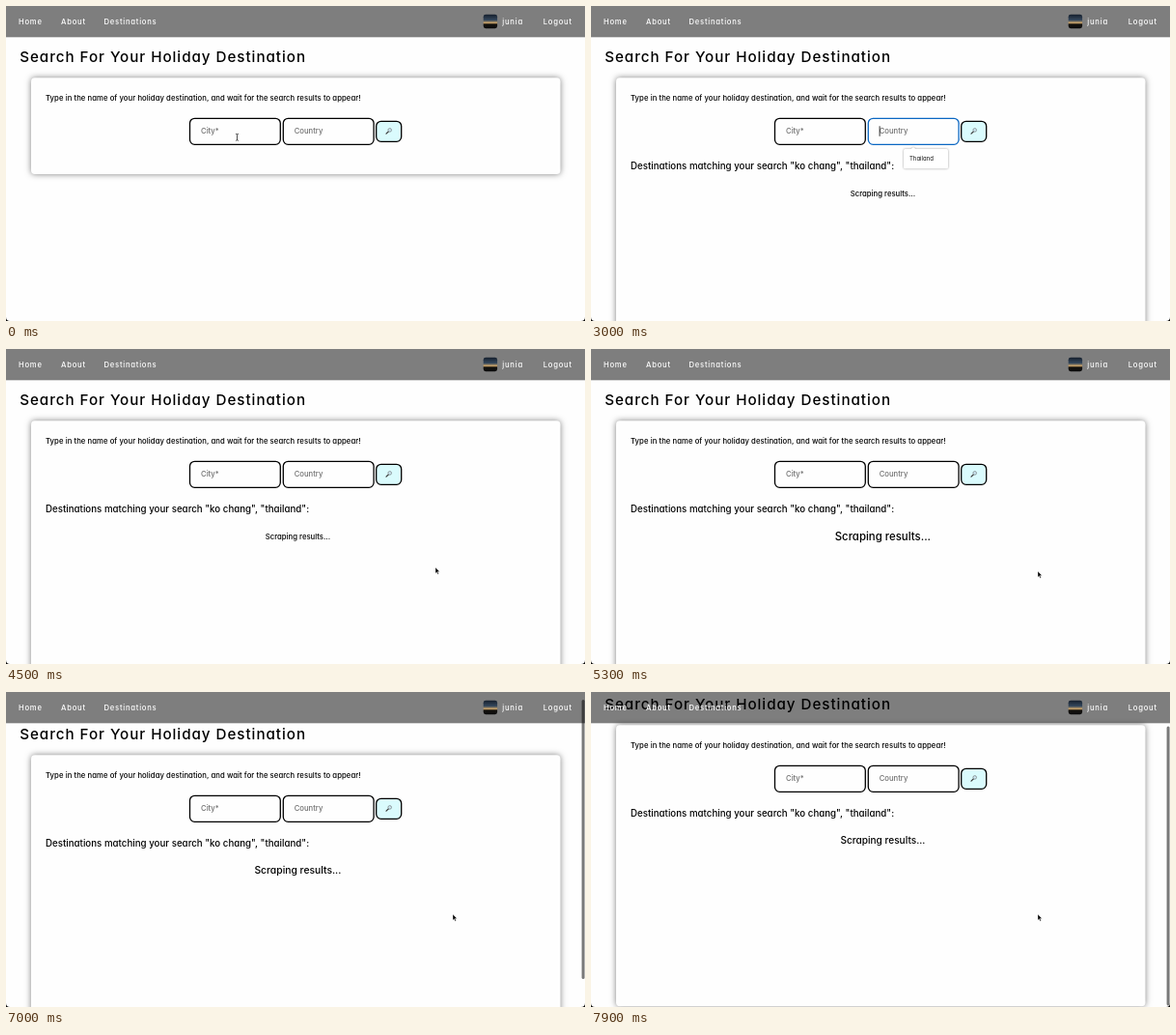
Recreate the animation shown at these times as an HTML page. Size 600 by 326 pixels, loop 8 s.

```html
<!DOCTYPE html>
<html lang="en">
<head>
<meta charset="utf-8">
<title>Holiday search</title>
<style>
  html, body { margin: 0; width: 100%; height: 100%; overflow: hidden; background: #fefefe; }
  svg { display: block; width: 600px; height: 326px; }
  text { font: 500 7.7px Inter, "Open Sans", sans-serif; font-feature-settings: "cv11"; white-space: pre; }
  .nav text { fill: #fff; letter-spacing: .74px; }
  .title { font-size: 15.2px; letter-spacing: .96px; }
  .intro { letter-spacing: .07px; }
  .match { font-size: 9.7px; letter-spacing: .02px; }
  .field { fill: #fefefe; stroke-width: 1.3px; }
  .menu { filter: drop-shadow(0 .5px 1px rgba(0,0,0,.4)); }
  .menu text { font-size: 6px; font-weight: 400; fill: #111; }
  .card { fill: #fefefe; filter: drop-shadow(0 0 3.4px rgba(0,0,0,.5)); }
</style>
</head>
<body>
<svg viewBox="0 0 600 326">
  <defs>
    <linearGradient id="dusk" x2="0" y2="1">
      <stop offset="0" stop-color="#16202e"/>
      <stop offset=".4" stop-color="#34475c"/>
      <stop offset=".6" stop-color="#c9a36a"/>
      <stop offset=".7" stop-color="#15130f"/>
      <stop offset="1" stop-color="#0b0b0c"/>
    </linearGradient>
  </defs>
  <rect width="600" height="326" fill="#fefefe"/>

  <g id="page">
    <text class="title" x="14.2" y="57.8">Search For Your Holiday Destination</text>
    <rect id="card" class="card" x="26" y="74.3" width="548.5" rx="4"/>
    <text class="intro" x="41" y="97.6">Type in the name of your holiday destination, and wait for the search results to appear!</text>
    <rect id="cityBox" class="field" x="190.5" y="116.3" width="93.8" height="27" rx="5"/>
    <rect id="countryBox" class="field" x="287.3" y="116.3" width="93.8" height="27" rx="5"/>
    <text id="city" x="202" y="132.2"></text>
    <text id="country" x="298.7" y="132.2"></text>
    <rect id="caret" y="124.3" width=".8" height="10.5"/>
    <rect x="383.7" y="119.3" width="26" height="21" rx="5" fill="#dafbfd" stroke="#000" stroke-width="1.3"/>
    <path d="M396.4 129.8 L394 132.2" stroke="#333" stroke-width="1.2" stroke-linecap="round"/>
    <circle cx="397.7" cy="128.4" r="1.8" fill="#cdeaf4" stroke="#666" stroke-width=".6"/>
    <g id="results">
      <text class="match" x="41" y="169">Destinations matching your search "ko chang", "thailand":</text>
      <g id="pulse"><text text-anchor="middle" y="2.5">Scraping results...</text></g>
    </g>
    <g id="menu" class="menu"></g>
  </g>

  <g class="nav">
    <rect width="600" height="32.3" fill="#000" fill-opacity=".5"/>
    <text x="13" y="18.6">Home</text>
    <text x="57" y="18.6">About</text>
    <text x="101.5" y="18.6">Destinations</text>
    <rect x="494.7" y="8.8" width="14.4" height="14.4" rx="2.4" fill="url(#dusk)"/>
    <text x="514.3" y="18.6">junia</text>
    <text x="556.7" y="18.6">Logout</text>
  </g>
  <rect id="thumb" x="596.6" width="3" height="289" rx="1.5" fill="#000" fill-opacity=".52"/>
  <path id="beam" d="M-1.4 -3.5 Q0 -3.5 0 -2.5 Q0 -3.5 1.4 -3.5 M0 -2.5 V2.5 M-1.4 3.5 Q0 3.5 0 2.5 Q0 3.5 1.4 3.5" fill="none" stroke="#222" stroke-width=".8"/>
  <path id="arrow" d="M0 0 V6.2 L1.4 4.9 L2.4 7.2 L3.4 6.8 L2.4 4.5 H4.4 Z" stroke="#fff" stroke-width=".4"/>
  <path d="M0 322 Q0 326 4 326 H0 Z M600 322 Q600 326 596 326 H600 Z"/>
</svg>
<script>
const LOOP = 8000, STEP = 100;
const SUBMIT = 2900, BLUR = 4500;
const el = id => document.getElementById(id);
const show = (id, on) => el(id).style.display = on ? '' : 'none';
const place = (id, x, y, k = 1) => el(id).setAttribute('transform', `translate(${x} ${y}) scale(${k})`);

// Linear interpolation through [time, value] points.
function track(points, t) {
  if (t <= points[0][0]) return points[0][1];
  for (let i = 1; i < points.length; i++) {
    const [t0, a] = points[i - 1], [t1, b] = points[i];
    if (t <= t1) return a + (b - a) * (t - t0) / (t1 - t0);
  }
  return points[points.length - 1][1];
}

const typed = (word, start, gap, t) =>
  word.slice(0, t < start ? 0 : Math.floor((t - start) / gap + 1));

function setInput(id, value, placeholder, focused) {
  const text = el(id);
  text.textContent = value || placeholder;
  text.setAttribute('fill', value ? '#000' : '#6f6f6f');
  el(id + 'Box').setAttribute('stroke', focused ? '#0b67c2' : '#000');
  if (focused) {
    const width = value ? text.getComputedTextLength() : 0;
    el('caret').setAttribute('x', +text.getAttribute('x') + width);
  }
}

let menuKey = '';
function setMenu(x, items) {
  const key = x + items.join();
  if (key === menuKey) return;
  menuKey = key;
  const rows = items.map((s, i) => `<text x="${x + 6}" y="${160.4 + i * 10}">${s}</text>`).join('');
  el('menu').innerHTML = !items.length ? '' :
    `<path d="M${x + 7} 148.4 l3 -2.4 l3 2.4 z" fill="#fff"/>` +
    `<rect x="${x}" y="148" width="46" height="${10.3 + items.length * 10}" rx="1.5" fill="#fff"/>` + rows;
}

function draw(t) {
  const sent = t >= SUBMIT;
  const focus = t < 100 || t >= BLUR ? '' : t < 1400 ? 'city' : 'country';
  const city = sent ? '' : typed('ko chang', 600, 100, t);
  const country = sent ? '' : typed('thailand', 1810, 83, t);

  setInput('city', city, 'City*', focus === 'city');
  setInput('country', country, 'Country', focus === 'country');
  show('caret', focus && !(sent && t % 1000 >= 300 && t % 1000 < 800));

  if (focus === 'city') setMenu(227, city ? ['ko chang'] : ['ko chang', 'lisbon', 'oslo', 'madrid', 'athens', 'rome']);
  else setMenu(324, focus ? ['Thailand'] : []);

  const scroll = track([[6900, 0], [7000, 9], [7300, 26], [7600, 29], [7900, 40]], t);
  place('page', 0, -scroll);
  el('card').setAttribute('height', sent ? 291 : 99.7);
  show('results', sent);
  place('pulse', 302.4, 194, 1.25 + .25 * Math.cos((t - 5215) / 1500 * 2 * Math.PI));

  show('thumb', scroll > 0);
  el('thumb').setAttribute('y', scroll * .887);

  const x = track([[3800, 240.5], [4100, 300], [4400, 425], [4600, 465], [4800, 463]], t);
  const y = track([[3800, 135.8], [4100, 165], [4400, 220], [4600, 232], [4800, 230]], t);
  const overField = t < 3900;
  show('beam', t < 600 || (t >= 3700 && overField));
  show('arrow', !overField);
  place('beam', t < 600 ? 239.5 : x, 135.8);
  place('arrow', x, y);
}

function frame() {
  draw(Math.floor(performance.now() % LOOP / STEP) * STEP);
  requestAnimationFrame(frame);
}
frame();
</script>
</body>
</html>
```
